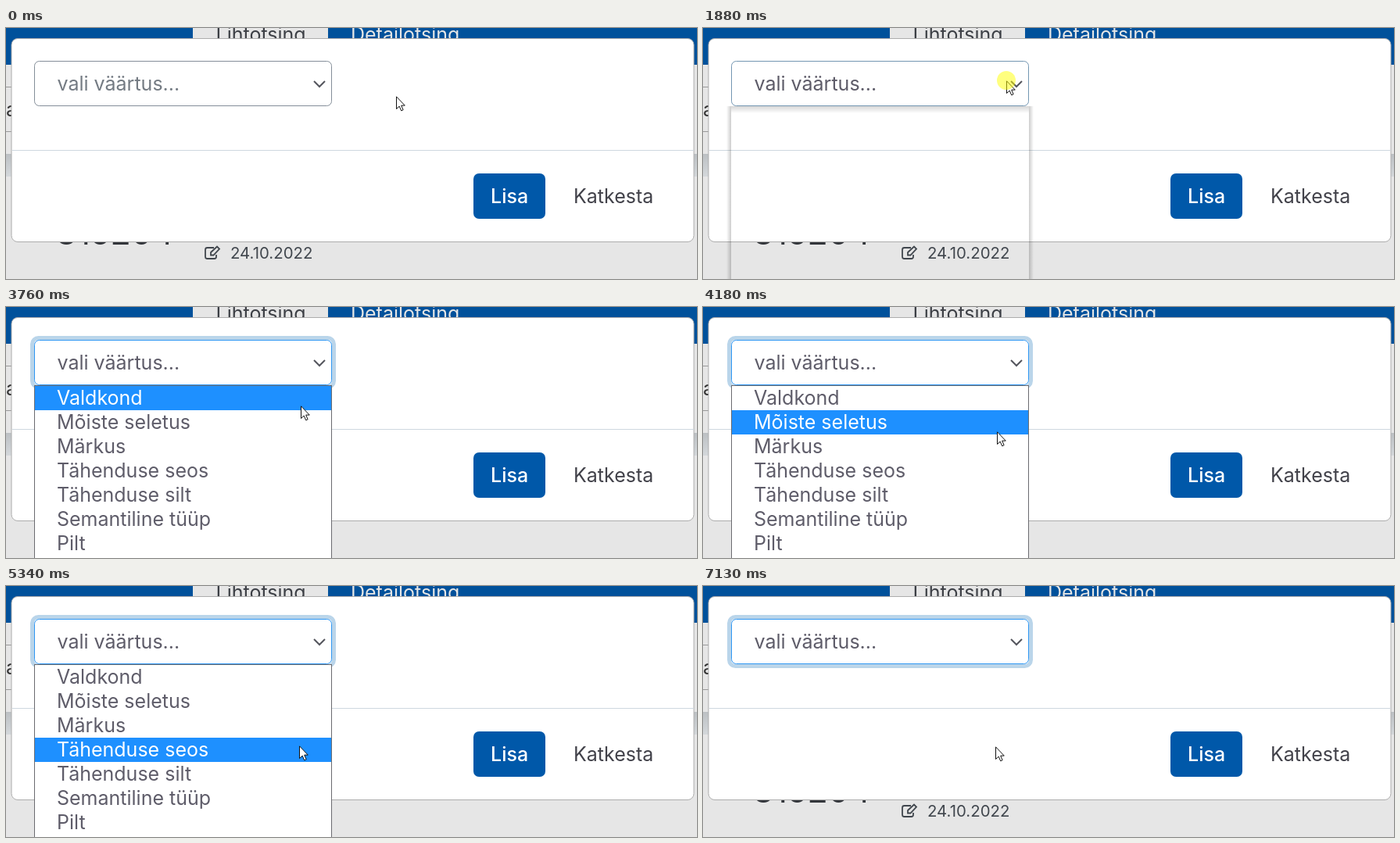
An HTML page for the animation above (7200 ms loop, 884x321 px).

```html
<!DOCTYPE html>
<html lang="et">
<head>
<meta charset="utf-8">
<title>Valikuaken</title>
<style>
  html, body { margin: 0; width: 100%; height: 100%; overflow: hidden; background: #e6e6e6; }
  svg { display: block; width: 884px; height: 321px; }
  text { font: 25px Inter, "Open Sans", sans-serif; }
</style>
</head>
<body>
<svg viewBox="0 0 884 321">
  <defs>
    <linearGradient id="band" x2="0" y2="1">
      <stop stop-color="#bcc0c3"/><stop offset="1" stop-color="#d4d8db"/>
    </linearGradient>
    <linearGradient id="side">
      <stop stop-opacity="0"/><stop offset="1" stop-opacity=".2"/>
    </linearGradient>
    <linearGradient id="under" x2="0" y2="1">
      <stop stop-opacity=".16"/><stop offset="1" stop-opacity="0"/>
    </linearGradient>
  </defs>

  <!-- dimmed page -->
  <rect width="884" height="321" fill="#e6e6e6"/>
  <rect width="884" height="47" fill="#00519b"/>
  <rect x="239" width="173" height="47" fill="#e6e6e6"/>
  <text x="268.500" y="17" fill="#3c3f45">Lihtotsing</text>
  <text x="441" y="17" fill="#e6e6e6">Detailotsing</text>
  <path d="M0 75.500H8M0 132.500H8" stroke="#999"/>
  <text x="14" y="113" text-anchor="end" fill="#333">sa</text>
  <rect y="161" width="884" height="29" fill="url(#band)"/>
  <text x="64" y="277" fill="#33363b" style="font-size:43px">315204</text>
  <g fill="none" stroke="#40464d" stroke-width="1.800">
    <path d="M266 281H257.500Q255 281 255 283.500V292.500Q255 295 257.500 295H266.500Q269 295 269 292.500V290"/>
    <path d="M262 290.500V287L270 279.500L273 282.500L265.500 290.500Z"/>
  </g>
  <text x="287" y="295" fill="#40464d" style="font-size:20.400px">24.10.2022</text>

  <!-- dialog -->
  <rect x="7" y="13.500" width="873" height="260" rx="8" fill="#fff" stroke="#acacac"/>
  <path d="M8 156.500H880" stroke="#ced8e0"/>
  <rect x="598" y="186" width="92" height="58" rx="7" fill="#0058a9"/>
  <text x="620" y="224" fill="#fff" font-weight="500" style="font-weight:500">Lisa</text>
  <text x="726" y="224" fill="#42424a">Katkesta</text>

  <!-- select box -->
  <rect id="halo" x="33.500" y="39.500" width="386" height="63" rx="8" fill="none" stroke="#bad5ea" stroke-width="5"/>
  <rect id="box" x="36.500" y="42.500" width="380" height="57" rx="6" fill="#fff"/>
  <text id="label" x="65.500" y="80">vali väärtus...</text>
  <path d="M394 68L401 75L408 68" fill="none" stroke="#55565e" stroke-width="2"/>
  <rect id="caret" x="217" y="56" width="1" height="30" fill="#55565e"/>

  <g id="shadow">
    <rect x="30" y="100" width="6" height="221" fill="url(#side)"/>
    <rect x="-423" y="100" width="6" height="221" fill="url(#side)" transform="scale(-1 1)"/>
    <rect x="36" y="100" width="381" height="9" fill="url(#under)"/>
  </g>
  <g id="list">
    <rect x="36.500" y="100.500" width="380" height="230" fill="#fff" stroke="#6b6b70"/>
    <rect id="mark" x="37" width="379" height="31" fill="#1e90ff"/>
  </g>

  <path id="arrow" d="M.5 .8V16.500L4.200 13.100L6.700 18.800L9.100 17.700L6.700 12.100H11.300Z" fill="#fff" stroke="#111"/>
  <circle id="click" r="12" fill="#ff0" fill-opacity=".5"/>
</svg>
<script>
const LOOP = 7200, ROW = 31, LIST_TOP = 101;
const $ = id => document.getElementById(id);
const set = (id, attrs) => {
  for (const key in attrs) $(id).setAttribute(key, attrs[key]);
};
const show = (id, opacity) => set(id, { opacity: Number(opacity) });
const within = (t, a, b) => t >= a && t < b;

const names = ['Valdkond', 'Mõiste seletus', 'Märkus', 'Tähenduse seos',
  'Tähenduse silt', 'Semantiline tüüp', 'Pilt'];
const items = names.map((name, i) => {
  const el = document.createElementNS('http://www.w3.org/2000/svg', 'text');
  el.textContent = name;
  el.setAttribute('x', 65);
  el.setAttribute('y', 125 + i * ROW);
  $('list').append(el);
  return el;
});

// Pointer moves: first step, last step, step count, end point
const start = [499, 87];
const moves = [
  [590, 1270, 10, 402, 70],
  [1340, 1610, 5, 388, 67],
  [3210, 3760, 8, 377, 126],
  [3830, 3900, 2, 376, 140],
  [3970, 4670, 11, 376, 191],
  [4740, 4740, 1, 376, 193],
  [4870, 5080, 4, 375, 203],
  [5340, 5410, 2, 374, 205]
];

const blinks = [70, 590, 1130, 1610, 2150, 2680, 3210, 3760, 4270, 4870, 5410, 5940, 6470, 7000];

function pointer(t) {
  let [x, y] = start;
  for (const [from, to, count, endX, endY] of moves) {
    if (t < from) break;
    const gap = count > 1 ? (to - from) / (count - 1) : 1;
    const p = Math.min(1, (Math.floor((t - from) / gap + 1e-6) + 1) / count);
    x += (endX - x) * p;
    y += (endY - y) * p;
  }
  return [Math.round(x), Math.round(y)];
}

function listOpacity(t) {
  if (t < 1950 || t >= 7000) return 0;
  return t < 2020 ? 0.5 : 1;
}

function focusLevel(t) {
  if (t < 1950) return 0;
  return t < 2020 ? 0.5 : 1;
}

function draw(t) {
  const [x, y] = pointer(t);
  const opened = t >= 1880;
  const focus = focusLevel(t);

  show('halo', focus);
  set('box', { stroke: focus ? '#2f97f3' : opened ? '#7396b2' : '#848e99' });
  set('label', { fill: opened ? '#5e5c69' : '#747b83' });
  show('caret', blinks.filter(b => t >= b).length % 2);
  show('shadow', within(t, 1880, 2020) || within(t, 7000, 7130));
  show('list', listOpacity(t));

  const row = Math.floor((y - LIST_TOP) / ROW);
  show('mark', row >= 0);
  set('mark', { y: LIST_TOP + Math.max(0, row) * ROW });
  items.forEach((el, i) => el.setAttribute('fill', i === row ? '#fff' : '#5e5c69'));

  set('arrow', { transform: `translate(${x} ${y})` });
  set('click', { cx: x, cy: y });
  show('click', within(t, 1880, 2480) || within(t, 6010, 7000));
}

const began = performance.now();
function tick() {
  draw((performance.now() - began) % LOOP);
  requestAnimationFrame(tick);
}
draw(0);
requestAnimationFrame(tick);
</script>
</body>
</html>
```
